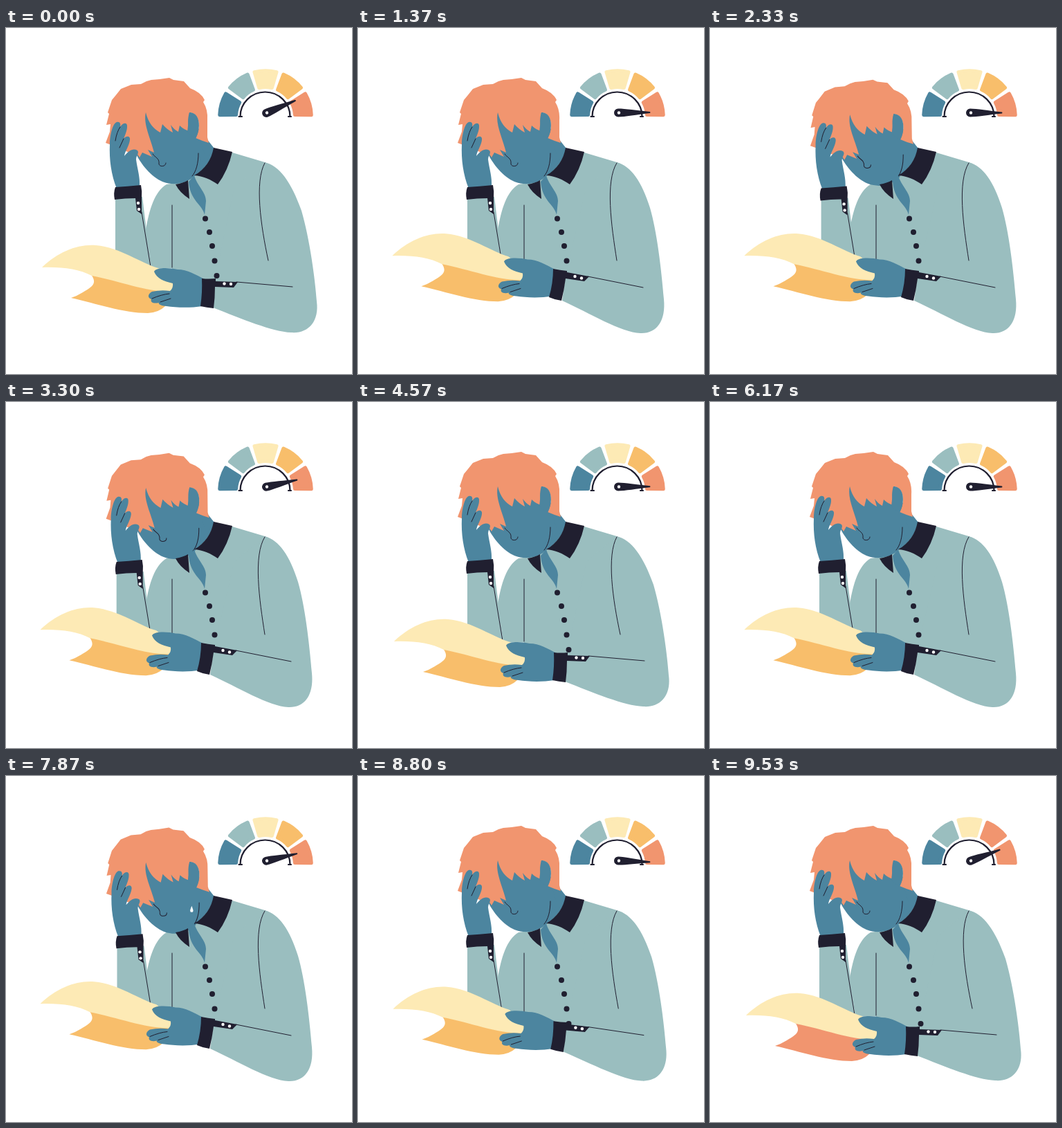
Animation of 500x500 px, one loop 9.61 s. Source, as an HTML page:

```html
<!DOCTYPE html>
<html lang="en">
<head>
<meta charset="utf-8">
<title>Stress gauge</title>
<style>
html, body { margin: 0; width: 100%; height: 100%; overflow: hidden; background: #fff; }
svg { display: block; width: 100%; height: 100%; }
.shirt { fill: #9abebf; }
.dark { fill: #201f30; }
.skin { fill: #4c859f; }
.hair { fill: #f1956f; }
.cream { fill: #fdeab5; }
.amber { fill: #f8be6b; }
.white { fill: #fff; }
.line { fill: none; stroke: #201f30; stroke-width: 1; stroke-linecap: round; }
#segments path { stroke-width: 5; stroke-linejoin: round; }
</style>
</head>
<body>
<svg viewBox="0 0 500 500">
  <g id="segments"></g>
  <path class="line" style="stroke-width:2.2" d="M336.500 128H341M338.500 128A36 35.500 0 0 1 410.500 128M408 128H412"/>
  <g id="needle">
    <path class="dark" d="M-1 -6C8 -6 26 -3 45 -1Q46 0 45 1C26 3 8 6 -1 6A6 6 0 0 1 -1 -6Z"/>
    <circle class="white" r="2.200"/>
  </g>

  <path class="shirt" d="M232 226C215 236 207 262 202 292L210 348L240 347V366H380L405 230L374 194L327 180L300 185L245 224Z"/>
  <path class="skin" d="M274 140L301 174C297 190 288 203 272 214L255 215Z"/>

  <g id="head">
    <path class="skin" d="M188 182C195 197 210 215 226 222C246 230 264 222 272 214L288 186L279 156L265 115L198 120Z"/>
    <path class="hair" d="M144 166L150 150L151 139L145 140L149 124L147 122L153 104L158 98L166 88L181 82L195 81L203 77L210 75L222 74L236 72L242 75L257 77L266 87Q282 93 287 104L285 107Q292 118 291 133V158L293 166L284 163L274 159C282 146 281 123 265 122C262 132 263 141 265 149Q257 147 251 141L249 150Q243 147 238 140L241 151Q233 147 226 139L223 151Q207 143 202 122C198 139 209 159 214 180L205 176L211 186L197 180L193 187L187 178L178 180L160 172Z"/>
    <path class="skin" d="M265 122C281 122 282 145 274 160L262 151Z"/>
    <path class="line" d="M212 182C215 187 222 188 221 196C221 201 231 201 231 195M278 181C278 195 275 207 269 214"/>
  </g>
  <path id="drop" class="white" d="M0 -5C1 -2 2.200 0 2.200 2A2.200 2.200 0 0 1 -2.200 2C-2.200 0 -1 -2 0 -5Z"/>

  <path class="skin" d="M264 222L272 213C276 228 289 237 289 250L287 270C284 255 266 250 264 222Z"/>
  <path class="dark" d="M300 173L327 179Q321 206 306 226C296 219 285 214 272 213C288 204 297 190 300 173ZM245 226Q256 224 263 220L265 247Q251 238 245 226Z"/>
  <path class="line" d="M240 256V346"/>

  <g id="raised">
    <path class="shirt" d="M158 244H197L210 350L158 327Z"/>
    <path class="line" d="M196 266L209 345"/>
    <path class="skin" d="M160 232C152 212 149 190 150 168C150 155 154 138 160 136C165 135 166 139 165 143C169 136 176 136 175 143C175 148 172 155 170 160C174 155 180 156 179 162C178 170 172 178 171 185C177 178 183 173 190 177C193 181 188 184 188 190C190 205 194 215 193 230Z"/>
    <path class="line" d="M165 143Q160 150 158 163M170 160L164 173"/>
    <path class="dark" d="M158 230Q175 229 195 227Q197 236 196 246L196 269L189 264L187 246Q172 246 157 248Q155 238 158 230Z"/>
    <circle class="white" cx="191" cy="253" r="2.200"/><circle class="white" cx="192" cy="262" r="2.200"/>
  </g>

  <path id="arm" class="shirt"/>
  <path id="armLine" class="line"/>
  <g class="dark">
    <circle cx="288" cy="275.500" r="4"/><circle cx="294" cy="295" r="4"/><circle cx="298" cy="315" r="4"/>
    <circle cx="301.500" cy="336.500" r="4"/><circle cx="304.500" cy="358" r="4"/>
  </g>
  <g id="paper">
    <path class="amber" id="sheet" d="M122 355C132 368 127 373 111 382Q103 387 94 390C130 398 170 412 205 412Q221 411 230 402L238 378Z"/>
    <path class="cream" d="M52 346C76 323 104 312 130 314C165 317 195 340 220 347L243 368L239 381C205 382 165 366 124 358C105 348 80 345 52 346Z"/>
  </g>
  <g id="hand">
    <path class="skin" d="M214 352C218 345 238 347 248 349C262 349 275 357 287 363L284 402C265 405 245 404 232 402C226 402 219 399 221 397C213 399 208 396 210 392C204 390 205 384 211 381Q224 378 237 380Q242 376 241 369C228 366 218 362 214 352Z"/>
    <path class="line" d="M211 391Q225 385 236 384M223 396L238 391"/>
  </g>
  <path id="cuff" class="dark"/>
  <g id="studs" class="white"><circle r="2.200"/><circle r="2.200"/></g>
</svg>
<script>
const LOOP = 9610, HALF = LOOP / 2;
const $ = id => document.getElementById(id);

// Each shape has a lowered and a lifted pose with matching commands.
const poses = {
  arm: [
    "M302 362L299 404C340 420 385 439 412 440C436 442 453 425 449 395C447 365 439 305 427 264C412 222 395 199 374 194L330 230Z",
    "M301 351L295 394C335 412 380 440 408 441C432 442 445 423 442 392C438 345 432 295 422 260C410 222 395 200 374 194L330 230Z"],
  armLine: [
    "M374 195C359 222 368 285 379 336M333 367L414 374",
    "M374 195C357 222 366 285 374 336M332 359L412 375"],
  cuff: [
    "M283 362Q293 363 303 362L303 366L335 367L329 375L302 374Q302 390 300 405Q290 404 281 402Q284 382 283 362Z",
    "M282 348Q292 350 302 351L302 353L334 359L327 366L300 362Q298 378 294 394Q285 393 276 389Q282 369 282 348Z"]
};
const studPoses = [[315.5, 369.5, 313.5, 359], [325, 370, 323, 361.5]];

const mix = (a, b, k) => a + (b - a) * k;
const mixPath = ([a, b], k) => {
  const ends = b.match(/[\d.]+/g);
  let i = 0;
  return a.replace(/[\d.]+/g, n => mix(+n, +ends[i++], k).toFixed(2));
};
const ease = (t, from, to) => {
  const p = Math.min(1, Math.max(0, (t - from) / (to - from)));
  return (1 - Math.cos(Math.PI * p)) / 2;
};
const move = (id, value) => $(id).setAttribute("transform", value);

function buildGauge() {
  const point = (r, deg) => {
    const a = deg * Math.PI / 180;
    return `${375 + r * Math.cos(a)} ${128 + r * Math.sin(a)}`;
  };
  ["#4c859f", "#9abebf", "#fdeab5", "#f8be6b", "#f1956f"].forEach((color, i) => {
    const start = 180 + i * 37, end = start + 32;
    const seg = document.createElementNS("http://www.w3.org/2000/svg", "path");
    seg.setAttribute("d", `M${point(42.5, start + 3.3)}L${point(66.3, start + 2)}A66.3 66.3 0 0 1 ${point(66.3, end - 2)}L${point(42.5, end - 3.3)}A42.5 42.5 0 0 0 ${point(42.5, start + 3.3)}Z`);
    seg.style.fill = seg.style.stroke = color;
    $("segments").append(seg);
  });
}

function draw(time) {
  const t = time % HALF;
  const lift = ease(t, -30, 1050) - ease(t, 3500, 4560);
  const dip = ease(t, 1450, 2500) - ease(t, 2850, 3900);

  for (const id in poses) $(id).setAttribute("d", mixPath(poses[id], lift));
  studPoses.forEach(([x0, y0, x1, y1], i) => {
    const stud = $("studs").children[i];
    stud.setAttribute("cx", mix(x0, x1, lift));
    stud.setAttribute("cy", mix(y0, y1, lift));
  });
  move("paper", `translate(${-2.5 * lift} ${-16.7 * lift})`);
  move("hand", `translate(${-3 * lift} ${-14.5 * lift})`);
  move("head", `translate(${1.6 * dip} ${2 * dip}) rotate(${-dip} 285 200)`);
  move("raised", `translate(${2.8 * dip} ${1.5 * dip})`);

  const swing = 2 * Math.PI * (time * 18 / LOOP + 0.04);
  move("needle", `translate(377 122.500) rotate(${-10.7 - 13 * Math.cos(swing)})`);

  const fall = (t - 2400) / 800;
  const visible = fall > 0 && fall < 1;
  $("drop").style.display = visible ? "" : "none";
  if (visible) move("drop", `translate(${mix(270, 268, fall)} ${mix(176, 196, fall)}) scale(${Math.min(1, fall * 4)})`);

  // The amber areas flash to coral just before the loop restarts.
  const amber = time >= 9530 ? "#f1956f" : "#f8be6b";
  const segment = $("segments").children[3];
  segment.style.fill = segment.style.stroke = $("sheet").style.fill = amber;
}

buildGauge();
const began = performance.now();
function tick() {
  draw((performance.now() - began) % LOOP);
  requestAnimationFrame(tick);
}
tick();
</script>
</body>
</html>
```
